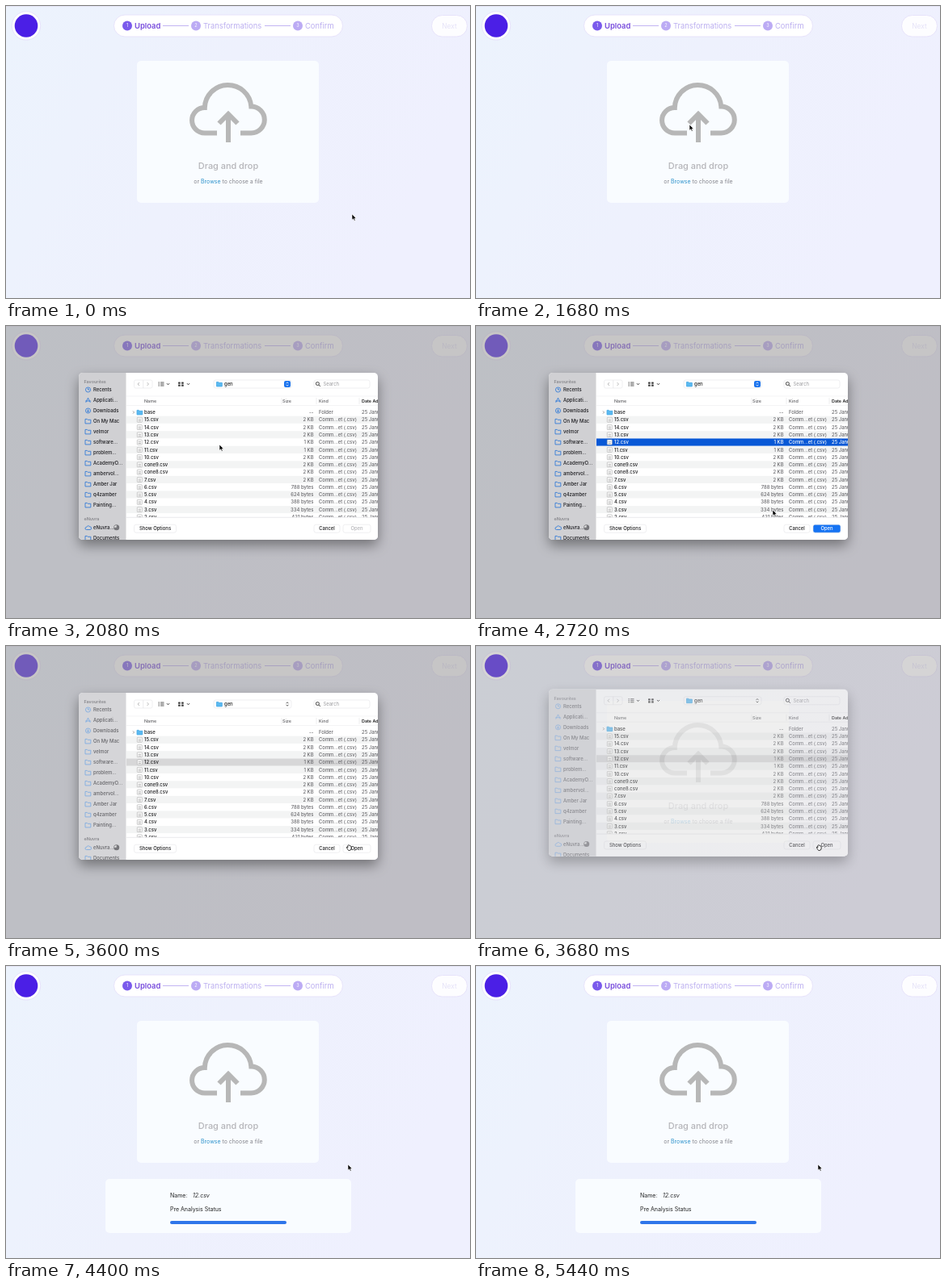
These frames come from a looping animation (574x362 px, 5.52 s). An HTML page:

```html
<!DOCTYPE html>
<html lang="en">
<head>
<meta charset="utf-8">
<title>File upload</title>
<style>
  html, body { margin: 0; width: 100%; height: 100%; overflow: hidden; background: #eef1fd; }
  svg { display: block; font-family: Inter, "Open Sans", sans-serif; }
  text { white-space: pre; }
  #sheet { font-weight: 500; }
</style>
</head>
<body>
<svg id="stage" width="574" height="362" viewBox="0 0 574 362">
  <defs>
    <linearGradient id="sky" x2="1" y2="0.3">
      <stop stop-color="#ecf3fd"/><stop offset=".5" stop-color="#eef1fd"/><stop offset="1" stop-color="#eff0fe"/>
    </linearGradient>
    <clipPath id="sheetClip"><rect x="90" y="58" width="370" height="207" rx="5"/></clipPath>
    <clipPath id="listClip"><rect x="149" y="100" width="311" height="137"/></clipPath>
    <filter id="shadow" x="-20%" y="-20%" width="140%" height="150%">
      <feDropShadow dx="0" dy="7" stdDeviation="8" flood-opacity=".4"/>
    </filter>
  </defs>
  <rect width="574" height="362" fill="url(#sky)"/>
  <rect width="574" height="1" fill="#e3e3f3"/>
  <g id="page"></g>
  <rect id="dim" width="574" height="362" fill="rgb(149,147,146)"/>
  <g id="sheet">
    <rect x="90" y="58" width="370" height="207" rx="5" fill="#fff" filter="url(#shadow)"/>
    <g clip-path="url(#sheetClip)">
      <g id="side"></g>
      <g id="tools"></g>
      <g id="list" clip-path="url(#listClip)"></g>
      <g id="foot"></g>
    </g>
  </g>
  <path id="arrow" d="M0 0V7.2L1.7 5.7L2.9 8.3L4.1 7.8L3 5.2H5.2Z" fill="#000" stroke="#fff" stroke-width=".6"/>
  <path id="hand" d="M-2.4 .2Q-3 -1 -2 -.8L-1.2 0V-2.6Q-.6 -3.6 0 -2.6Q.6 -3.4 1.2 -2.4Q2 -2.9 2.4 -1.8Q3.2 -1.8 3.1 -.8V1.2Q2.8 3.4 1 3.4H-.2Q-1.2 3 -2.4 .2Z" fill="#fff" stroke="#000" stroke-width=".8"/>
</svg>
<script>
const $ = id => document.getElementById(id);
const LOOP = 5520, STEP = 80;

// y is the vertical middle of the line of text
const text = (x, y, s, size, fill, more = '') =>
  `<text x="${x}" y="${y + size * .36}" font-size="${size}" fill="${fill}" ${more}>${s}</text>`;
const box = (x, y, w, h, r, fill, more = '') =>
  `<rect x="${x}" y="${y}" width="${w}" height="${h}" rx="${r}" fill="${fill}" ${more}/>`;
const dot = (x, y, r, fill, more = '') => `<circle cx="${x}" cy="${y}" r="${r}" fill="${fill}" ${more}/>`;
const line = (d, stroke, w = .8, more = '') =>
  `<path d="${d}" fill="none" stroke="${stroke}" stroke-width="${w}" ${more}/>`;
const weight = w => `font-weight="${w}"`;
const right = 'text-anchor="end"', middle = 'text-anchor="middle" ';
const outline = 'stroke="#e4e4e7" stroke-width=".6"';

function drawPage() {
  const rim = 'stroke="#e7e3fb" stroke-width="1"';
  const steps = [[150, 159, 'Upload'], [235, 244, 'Transformations'], [361, 370, 'Confirm']];
  let s = dot(25, 24.5, 17.7, '#fff', rim) + dot(25, 24.5, 14.3, '#4b1fe6');
  s += box(133.5, 11, 283, 27, 13.5, '#fff', rim) + box(526.5, 11.5, 44, 26.5, 13, '#fdfdff', rim);
  s += text(548.5, 24.5, 'Next', 8.4, '#e5e2f8', middle);
  s += line('M194 24.5H226M320 24.5H352', '#c2b4f3', 1.2);
  steps.forEach(([cx, x, label], i) => {
    s += dot(cx, 24.5, 6, i ? '#bcabf4' : '#7a5aec') + text(cx, 24.5, i + 1, 5.5, '#fff', middle);
    s += text(x, 24.5, label, 9.4, i ? '#bcaff0' : '#774bdc', weight(i ? 400 : 600));
  });

  s += box(162, 68, 225, 176, 5, '#f9fcff');
  s += line('M261 157.5H245.8A15.7 15.7 0 0 1 245.8 126A28.8 28.8 0 0 1 303.3 124.5A16.5 16.5 0 0 1 303.3 157.5H290', '#b7b7b7', 6);
  s += line('M275 169V136M263.5 145.5L275 134L286.5 145.5', '#b7b7b7', 6);
  s += text(275, 198.5, 'Drag and drop', 10.9, '#b4b4b8', middle + weight(500));
  s += text(275, 217, 'or <tspan fill="#2990cb">Browse</tspan> to choose a file', 6.95, '#85858c', middle);

  s += '<g id="panel">' + box(123, 264, 304, 67, 5, '#f9fcff');
  s += text(203, 284.5, 'Name:', 7, '#222') + text(231, 284.5, '12.csv', 7, '#222', 'font-style="italic"');
  s += text(203, 301, 'Pre Analysis Status', 7, '#222');
  s += '<rect id="bar" x="203" y="316" height="4" rx="2" fill="#2e75ea"/></g>';
  $('page').innerHTML = s;
}

const folder = (x, y, c, fill = 'none') =>
  `<path d="M${x} ${y - 2.6}h2.3l.8 .9h3.7v4.6h-6.8z" fill="${fill}" stroke="${c}" stroke-width=".8" stroke-linejoin="round"/>`;
const chevron = (x, y) => line(`M${x - 1.5} ${y - .8}l1.5 1.6l1.5 -1.6`, '#333', 1);

function drawSide(active) {
  const c = active ? '#2273d8' : '#77a9e4', ink = active ? '#1c1c20' : '#66666a';
  const items = ['Recents', 'Applicati...', 'Downloads', 'On My Mac', 'velmor', 'software...', 'problem...',
    'AcademyO...', 'ambervol...', 'Amber Jar', 'q4zamber', 'Painting...'];
  let s = box(90, 58, 58.5, 207, 0, active ? '#d0d0d3' : '#d5d5d8');
  s += text(96.5, 69, 'Favourites', 5.4, '#88888d', weight(600));
  s += text(96.5, 239, 'eNuvra', 5.4, '#88888d', weight(600));
  items.forEach((label, i) => {
    const y = 79 + i * 13;
    if (i == 0) s += dot(101.5, y, 3, 'none', `stroke="${c}" stroke-width=".8"`) + line(`M101.5 ${y - 2}V${y}H103.2`, c);
    else if (i == 1) s += line(`M98.7 ${y + 2.8}L101.5 ${y - 2.8}L104.3 ${y + 2.8}M98.2 ${y + 1}H104.8`, c);
    else if (i == 2) s += dot(101.5, y, 3, 'none', `stroke="${c}" stroke-width=".8"`) + line(`M101.5 ${y - 1.8}v3.4m-1.4 -1.4l1.4 1.4l1.4 -1.4`, c);
    else s += folder(98, y, c);
    s += text(108, y, label, 5.9, ink);
  });
  s += line('M99.5 252.5a1.6 1.6 0 0 1 .2 -3.2a2.2 2.2 0 0 1 4 -.4a1.8 1.8 0 0 1 .3 3.6z', c);
  s += text(108, 250, 'eNuvra...', 5.9, ink);
  s += dot(136.7, 249.7, 3.5, '#77777b') + '<path d="M136.7 249.7V246.9A2.8 2.8 0 0 0 133.9 249.7Z" fill="#ddd"/>';
  s += folder(98, 263, c) + text(108, 263, 'Documents', 5.9, ink);
  $('side').innerHTML = s;
}

function drawTools(active) {
  let s = box(158.5, 67, 22.5, 10, 2, '#fff', outline) + line('M169.7 67V77', '#dedee2', .6);
  s += line('M165 70l-2 2l2 2M174.5 70l2 2l-2 2', '#aaa');
  s += line('M188.5 70H190M191 70H195.5M188.5 72H190M191 72H195.5M188.5 74H190M191 74H195.5', '#333');
  for (const x of [213, 217]) for (const y of [69.5, 72.6]) s += box(x, y, 2.8, 2.2, .4, '#444');
  s += chevron(200.5, 72) + chevron(225.5, 72);
  s += box(257, 67, 96, 10, 2.5, '#fff', outline) + folder(260.5, 72, '#43a8e6', '#5bb9f0') + text(270, 72, 'gen', 5.9, '#222');
  if (active) s += box(344, 68, 8, 8, 2, '#1a73ee');
  s += line('M346.6 71.2l1.4 -1.5l1.4 1.5M346.6 72.8l1.4 1.5l1.4 -1.5', active ? '#fff' : '#333');
  s += box(381, 67, 69, 10, 2.5, '#fff', outline);
  s += dot(385.4, 71.5, 2, 'none', 'stroke="#333" stroke-width=".9"') + line('M386.9 73l2 2', '#333', .9);
  s += text(392.5, 72, 'Search', 5.9, '#9a9a9e', weight(400));
  s += line('M149 87H460M149 98.5H460', '#ececef', .6) + line('M341 89V97M384 89V97M437 89V97', '#e2e2e5', .6);
  s += text(171, 93, 'Name', 5.4, '#5c5c60') + text(342, 93, 'Size', 5.4, '#5c5c60');
  s += text(387, 93, 'Kind', 5.4, '#5c5c60') + text(440, 93, 'Date Added', 5.4, '#222', weight(600));
  $('tools').innerHTML = s;
}

function drawList(picked, active) {
  const names = ['base', 15, 14, 13, 12, 11, 10, 'cone9', 'cone8', 7, 6, 5, 4, 3, 2];
  const bytes = [788, 624, 388, 334, 431];
  let s = '';
  names.forEach((name, i) => {
    const y = 107 + i * 9.28, chosen = picked && i == 4, lit = chosen && active;
    const ink = lit ? '#fff' : '#1c1c1e', soft = lit ? '#fff' : '#67676b';
    const size = !i ? '--' : i > 9 ? bytes[i - 10] + ' bytes' : (i == 4 || i == 5 ? 1 : 2) + ' KB';
    const fill = lit ? '#0858d6' : chosen ? '#d7d7d8' : i % 2 ? '#f3f4f4' : '#fff';
    s += box(149, y - 4.64, 311, 9.28, 0, fill);
    if (i) s += box(162.3, y - 3, 6, 6, .6, '#fff', 'stroke="#aaa" stroke-width=".6"') + line(`M163.6 ${y - .5}H167M163.6 ${y + 1.4}H167`, '#999', .7);
    else s += line(`M157 ${y - 1.6}l1.6 1.6l-1.6 1.6`, '#888') + folder(162, y, '#43a8e6', '#5bb9f0');
    s += text(171, y, name + (i ? '.csv' : ''), 5.9, ink) + text(380.5, y, size, 5.9, soft, right);
    s += text(387, y, i ? 'Comm...et (.csv)' : 'Folder', 5.9, soft) + text(440, y, '25 January', 5.9, soft);
  });
  $('list').innerHTML = s;
}

function drawFoot(picked, active) {
  const blue = picked && active;
  const button = (x, w, label, fill, ink) =>
    box(x, 246.2, w, 10, 2.5, fill, outline) + text(x + w / 2, 251.2, label, 5.9, ink, middle);
  $('foot').innerHTML = box(149, 237, 311, 28, 0, '#fff') + line('M149 237.3H460', '#dcdcdf', .6) +
    button(158.5, 52, 'Show Options', '#fff', '#1c1c1e') + button(381, 32, 'Cancel', '#fff', '#1c1c1e') +
    button(417, 34, 'Open', blue ? '#1573f3' : '#fff', blue ? '#fff' : picked ? '#1c1c1e' : '#b4b4b8');
}

let drawn = '';
function drawSheet(picked, active) {
  const key = `${picked} ${active}`;
  if (key == drawn) return;
  drawn = key;
  drawSide(active);
  drawTools(active);
  drawList(picked, active);
  drawFoot(picked, active);
}

const clamp = v => Math.max(0, Math.min(1, v));
const easeBoth = k => k * k * (3 - 2 * k);
const easeIn = k => k * k;
const easeOut = k => 1 - (1 - k) * (1 - k);

// [start, end, target x, target y, easing]
const moves = [
  [400, 880, 264, 147, easeBoth],
  [2400, 2720, 367, 228, easeIn],
  [2720, 3120, 424, 250, easeOut],
  [3760, 3840, 423, 246, easeOut]
];
function pointer(t) {
  let x = 428, y = 258;
  for (const [from, to, tx, ty, ease] of moves) {
    const k = ease(clamp((t - from) / (to - from)));
    x += (tx - x) * k;
    y += (ty - y) * k;
  }
  return `translate(${x} ${y})`;
}

const show = (id, on) => $(id).setAttribute('visibility', on ? 'visible' : 'hidden');

function render(t) {
  const opening = t > 1680 ? 1 - Math.exp((1680 - t) / 55) : 0;
  const closing = clamp((t - 3640) / 160);
  const left = 1 - closing;

  drawSheet(t >= 2240, t < 3440);
  show('sheet', opening > 0 && left > 0);
  $('sheet').setAttribute('transform', `translate(0 ${-13 * (1 - opening) - 17 * closing})`);
  $('sheet').setAttribute('opacity', closing ? .15 + .65 * left : 1);
  $('dim').setAttribute('opacity', .52 * opening * left);

  show('panel', t >= 3920);
  $('bar').setAttribute('width', 144 * clamp((t - 3840) / 160));

  const hand = t >= 3440 && t < 3840;
  show('arrow', !hand);
  show('hand', hand);
  for (const id of ['arrow', 'hand']) $(id).setAttribute('transform', pointer(t));
}

drawPage();
const start = performance.now();
function tick() {
  const t = (performance.now() - start) % LOOP;
  render(Math.floor(t / STEP) * STEP);
  requestAnimationFrame(tick);
}
tick();
</script>
</body>
</html>
```
